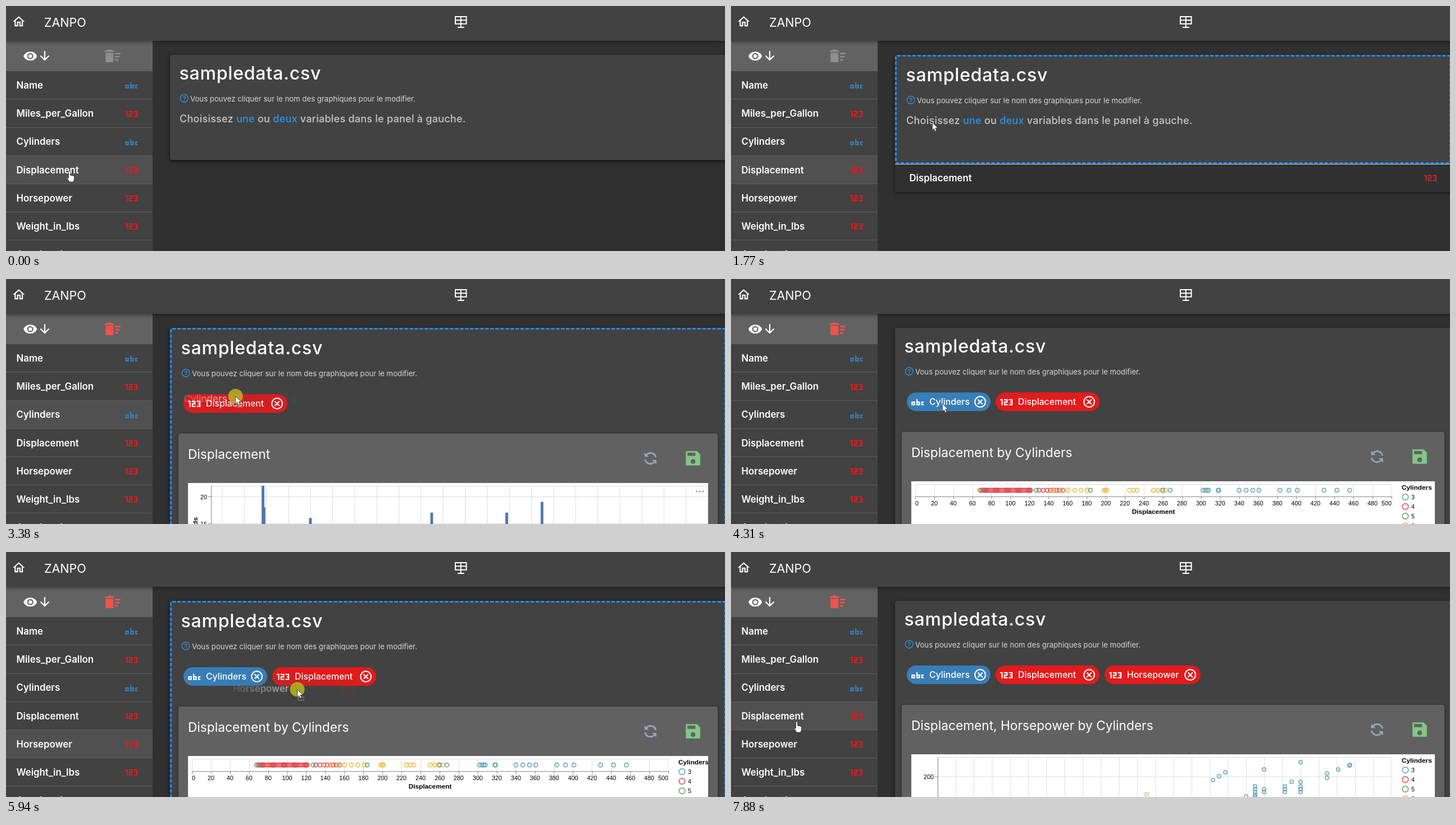
Recreate the animation shown at these times as an HTML page. Size 1280 by 436 pixels, loop 7970 ms.

```html
<!DOCTYPE html>
<html lang="fr">
<head>
<meta charset="utf-8">
<title>Tableau de bord</title>
<style>
html, body { margin: 0; width: 100%; height: 100%; overflow: hidden; background: #303030; }
body { position: relative; font-family: Inter, "Open Sans", sans-serif; font-optical-sizing: none; color: #fff; }
div, svg { position: absolute; box-sizing: border-box; }
svg { overflow: visible; }
.t { white-space: pre; line-height: 40px; margin-top: -20px; }
.blue { color: #3091e6; }
#top { left: 0; top: 0; width: 1280px; height: 62px; background: #424242; z-index: 3;
  box-shadow: 0 2px 4px -1px rgba(0,0,0,.2), 0 4px 5px rgba(0,0,0,.14), 0 1px 10px rgba(0,0,0,.12); }
#side { left: 0; top: 62px; width: 261px; height: 380px; background: #424242; z-index: 2; }
#tools { left: 0; top: 0; width: 261px; height: 54px; background: #626262; }
#bin { left: 190px; top: 27px; }
.row { left: 0; width: 261px; height: 50.2px; border-bottom: 1px solid #5e5e5e; }
.row.on { background: #505050; }
.row .t, #slot .t, #ghost .t { font-weight: 600; font-size: 16.8px; }
#card { left: 292px; top: 87px; width: 990px; background: #424242; border-radius: 4px;
  box-shadow: 0 2px 5px rgba(0,0,0,.45), 0 4px 8px rgba(0,0,0,.25); }
#card.drop { border: 3px dashed #1e90ff; }
.name { font-size: 32px; font-weight: 500; letter-spacing: .8px; }
.help { font-size: 13.2px; color: #d8d8d8; }
.hint { font-size: 18px; font-weight: 500; letter-spacing: .25px; color: #c8c8c8; }
#slot { left: 292px; top: 281px; width: 990px; height: 50px; background: #303030; border-top: 1px solid #d5dde4;
  box-shadow: 0 2px 5px rgba(0,0,0,.5); }
.scene { left: 0; top: 0; width: 100%; }
.chip { top: 115px; height: 33px; border-radius: 17px; }
.chip .t { left: 40px; top: 16.5px; font-size: 15.8px; font-weight: 500; }
.panel { left: 12px; right: 12px; top: 185px; height: 300px; background: #616161; border-radius: 4px;
  box-shadow: 0 1px 5px rgba(0,0,0,.4); }
.panel > .t { font-size: 22.7px; }
.plot { left: 17px; right: 17px; top: 88px; height: 200px; background: #fff; overflow: hidden; }
.plot svg { font-family: "Liberation Sans", Arial, sans-serif; font-size: 10.8px; }
.plot .b { font-size: 11.8px; font-weight: bold; }
.more { right: 1px; top: 1px; width: 28px; height: 28px; border: 1px solid #eee; border-radius: 50%; }
#ghost { width: 261px; height: 50px; background: rgba(70,70,70,.35); opacity: .5; z-index: 5; }
#mouse { left: 0; top: 0; z-index: 6; }
</style>
</head>
<body>
<div id="top"></div>
<div id="side"><div id="tools"></div></div>
<div id="card"></div>
<div id="slot"></div>
<div id="ghost"></div>
<svg id="mouse" width="1" height="1" stroke-width=".8">
  <circle id="press" r="13" fill="#beb81e" fill-opacity=".82"/>
  <path id="hand" fill="#fff" stroke="#222" d="M-1.5 1a1.5 1.5 0 0 1 3 0v6l7 1.5V14L7 19H0l-4.500-7 1.500-1 1.500 1.500z"/>
  <g id="arrow">
    <path fill="#fff" stroke="#222" d="M0 0v14l3-3 2 5 2.500-1-2-5H10z"/>
    <rect id="carry" x="1.5" y="13.5" width="10" height="6" fill="none" stroke="#ddd" stroke-dasharray="1.5 1"/>
  </g>
</svg>
<script>
const $ = id => document.getElementById(id);
const RED = '#e41a1c', BLUE = '#377eb8';

const solid = d => `<path d="${d}"/>`;
const stroke = d => `<path d="${d}" fill="none" stroke="currentColor" stroke-width="2"/>`;
const disc = r => `M${12 - r} 12a${r} ${r} 0 0 0 ${2 * r} 0a${r} ${r} 0 0 0-${2 * r} 0`;
const ICONS = {
  home: solid('M12 3L2 12h3v8h6v-6h2v6h6v-8h3zM12 5.7l5 4.500V18h-2v-6H9v6H7v-7.800z'),
  panel: stroke('M2 3h20v13H2zM2 9.500h20M12 3v20M6 22.500h12'),
  eye: solid('M1 12a12 12 0 0 1 22 0a12 12 0 0 1-22 0z' + disc(5) + disc(3)),
  down: stroke('M12 4v14M5 11.500l7 7 7-7'),
  clear: solid('M3 8h10v12H3zM2 5h3l1-1h4l1 1h3v2H2zM15 8h7v2h-7zM15 12h6v2h-6zM15 16h4v2h-4z'),
  abc: stroke('M7 17v-5H3v4h4M11 7v9h4v-4h-4M22 12h-3v4h3'),
  num: stroke('M2 8h3v9M8 8h5v4H9v4h5M16 8h5v8h-5M18 12h3'),
  sync: stroke('M6 8a7 7 0 0 0 6 11M18 16a7 7 0 0 0-6-11') + solid('M12 15l4 4-4 4zM12 1L8 5l4 4z'),
  save: solid('M17 3H3v18h18V7zM5 5h10v4H5zM12 13a3 3 0 0 0 0 6a3 3 0 0 0 0-6'),
  help: stroke(disc(10)) + stroke('M9 10a3 3 0 1 1 4 3l-1 2M12 16v2'),
  close: stroke(disc(9) + 'M8 8l8 8M16 8l-8 8')
};

const text = (s, x, y, cls = '') => `<div class="t ${cls}" style="left:${x}px;top:${y}px">${s}</div>`;
const icon = (name, x, y, k, color = '#fff', extra = '') =>
  `<svg viewBox="0 0 24 24" width="${24 * k}" height="${24 * k}" fill="currentColor" fill-rule="evenodd"
    style="left:${x - 12 * k}px;top:${y - 12 * k}px;color:${color};${extra}">${ICONS[name]}</svg>`;
const tint = k => k === 'abc' ? BLUE : RED;
const add = (id, html) => $(id).insertAdjacentHTML('beforeend', html);

// Header and sidebar
const fields = [['Name', 'abc'], ['Miles_per_Gallon', 'num'], ['Cylinders', 'abc'], ['Displacement', 'num'],
  ['Horsepower', 'num'], ['Weight_in_lbs', 'num'], ['Acceleration', 'num']];
const ROW = 50.15, ROW0 = 116.3;
const label = ([name, k]) => text(name, 18.5, 24.8) + icon(k, 223, 25.3, 1.1, tint(k));

add('top', icon('home', 22.6, 27.5, 1.06) + `<div class="t" style="left:68px;top:29px;font-size:21.5px">ZANPO</div>` +
  icon('panel', 809.6, 27.5, .98));
add('tools', icon('eye', 43, 27.2, 1.1) + icon('down', 68.5, 27.2, 1.08) +
  `<div id="bin">${icon('clear', 0, 0, 1.4, 'inherit')}</div>`);
fields.forEach((f, i) => add('side', `<div class="row" style="top:${ROW0 - 62 + i * ROW}px">${label(f)}</div>`));
add('slot', text('Displacement', 25.5, 23.5) + icon('num', 953, 24, 1.1, '#b72a2c'));

// Charts, drawn in stage coordinates
const line = (x1, y1, x2, y2, c = '#ddd') => `<path d="M${x1} ${y1}L${x2} ${y2}" stroke="${c}"/>`;
const word = (s, x, y, anchor = 'middle', cls = '') =>
  `<text x="${x}" y="${y}" text-anchor="${anchor}" class="${cls}">${s}</text>`;
const ring = (x, y, c, r = 3.5, o = .8) =>
  `<circle cx="${x}" cy="${y}" r="${r}" fill="none" stroke="${c}" stroke-width="1.9" opacity="${o}"/>`;
const range = (n, f) => Array.from({ length: n }, (_, i) => f(i)).join('');
const TEAL = '#5ba3ad', ROSE = '#e04a50', GREEN = '#5d9e6c', GOLD = '#ecb93f';

// Frame with vertical grid lines; the bottom may lie below the stage
const frame = (x0, x1, n, top, bottom = 460) => line(x0, top, x1, top) +
  range(n + 1, i => line(x0 + (x1 - x0) * i / n, top, x0 + (x1 - x0) * i / n, bottom));
const yTick = (x0, x1, y, s) => line(x0, y, x1, y) + line(x0 - 5, y, x0, y, '#888') + word(s, x0 - 7, y + 4, 'end');

function histogram() {
  const X = v => 264 + v * 1.9636, Y = n => 576 - n * 9.6;
  const peaks = { 97: 22, 98: 18, 140: 16, 250: 17, 318: 17, 350: 19 };
  return frame(382, 1247, 22, 365.5) + line(362, 365.5, 382, 365.5) +
    [20, 15].map(n => yTick(362, 1247, Y(n) + .5, n)).join('') + line(362.5, 365, 362.5, 460, '#888') +
    Object.entries(peaks).map(([v, n]) =>
      `<rect x="${X(v) - 2.4}" y="${Y(n)}" width="4.8" height="100" fill="#4c78a8"/>`).join('') +
    `<text class="b" text-anchor="end" transform="translate(338 421) rotate(-90)">Number of Records</text>`;
}

const legend = () => word('Cylinders', 1194, 375, 'start', 'b') + [TEAL, ROSE, GREEN, GOLD].map((c, i) =>
  ring(1200.5, 388 + i * 17, c, 5.3) + word(3 + i, 1211, 392 + i * 17, 'start')).join('');

function strip() {
  const X = v => 328 + v * 1.696;
  const run = (c, a, b, n) => range(n, i => ring(X(a + (b - a) * i / (n - 1) + Math.sin(i * 7)), 376, c));
  return frame(328.5, 1176, 25, 365.5, 387) + line(328, 387.5, 1177, 387.5, '#888') +
    range(26, i => line(X(i * 20) + .5, 387, X(i * 20) + .5, 392, '#888') +
      word(i * 20, X(i * 20), 402.5, i === 0 ? 'start' : i === 25 ? 'end' : 'middle')) +
    word('Displacement', 752, 418, 'middle', 'b') +
    run(ROSE, 68, 122, 42) + run(ROSE, 130, 156, 8) + run(GOLD, 145, 181, 6) + run(GOLD, 198, 200, 3) +
    run(GOLD, 225, 232, 3) + run(GOLD, 250, 262, 4) + run(GREEN, 70, 183, 3) + run(TEAL, 260, 267, 2) +
    run(TEAL, 302, 307, 4) + run(TEAL, 318, 318, 2) + run(TEAL, 340, 360, 4) + run(TEAL, 383, 400, 3) +
    run(TEAL, 429, 455, 3) + legend();
}

function scatter() {
  const stack = (x, y, n) => range(n, i => ring(x, y + i * 5, TEAL, 3.1));
  const slope = (x, y, dx, dy, n) => range(n, i => ring(x + dx * i, y + dy * i, TEAL, 3.1));
  return frame(368, 1176, 25, 365.5) + yTick(368, 1176, 400, 200) + line(368.5, 365, 368.5, 460, '#888') +
    slope(858, 406, 11, -7, 3) + slope(1061, 394, 20, -7, 3) + slope(1061, 402, 41, -23, 2) +
    slope(949, 387, 65, -13, 2) + slope(998, 409, 16, 0, 2) + slope(917, 435, 16, 0, 2) +
    stack(933, 417, 4) + stack(949, 422, 2) + stack(986, 417, 3) + stack(1014, 417, 3) +
    ring(740, 431, '#f58a4b', 3.1, .55) + legend();
}

// Card and its four scenes
const chip = (name, k, x, w) => `<div class="chip" style="left:${x}px;width:${w}px;background:${tint(k)}">
  ${icon(k, 19.5, 16.8, 1.1)}<div class="t">${name}</div>${icon('close', w - 18.5, 16.2, 1.05)}</div>`;
const scene = html => add('card', `<div class="scene">${html}</div>`);
const result = (title, chart, chips, menu = .2) => scene(chips + `<div class="panel">${text(title, 17, 36.5)}
  ${icon('sync', 0, 44.5, 1.35, '#9aa6c4', 'left:auto;right:104px;transform:rotate(-45deg)')}
  ${icon('save', 0, 44.5, 1.42, '#81c784', 'left:auto;right:27px')}
  <div class="plot"><svg viewBox="321 360 932 100" width="932" height="100">${chart}</svg>
  <div class="more" style="opacity:${menu}"><svg width="1" height="1" fill="#aaa" style="left:13px;top:13px">
  ${range(3, i => `<circle cx="${i * 5.5 - 5.5}" r="1.8"/>`)}</svg></div></div></div>`);

add('card', text('sampledata.csv', 16.5, 33, 'name') + icon('help', 25, 77.5, .68, '#3091e6') +
  text('Vous pouvez cliquer sur le nom des graphiques pour le modifier.', 36, 77.5, 'help'));
scene(text('Choisissez <span class="blue">une</span> ou <span class="blue">deux</span> variables dans le panel à gauche.',
  17, 113.5, 'hint'));
const cyl = chip('Cylinders', 'abc', 21, 149), disp = x => chip('Displacement', 'num', x, 185);
result('Displacement', histogram(), disp(21), 1);
result('Displacement by Cylinders', strip(), cyl + disp(179));
result('Displacement, Horsepower by Cylinders', scatter(), cyl + disp(179) + chip('Horsepower', 'num', 373, 171));

// Each drag: press a row, carry it to the card, release, move on
const LOOP = 7970, STEP = 76.6, CARRY = 970, BACK = 770, SETTLE = 150;
const drags = [
  { down: 300, up: 1690, row: 3, from: [113, 294], to: [460, 203], next: [144, 243] },
  { down: 2690, up: 4160, row: 2, from: [144, 243], to: [476, 207], next: [166, 349] },
  { down: 5160, up: 6640, row: 4, from: [166, 349], to: [564, 243], next: [117, 302] }
];
const mix = (a, b, u) => a + (b - a) * u;
const stepped = t => Math.floor(t / STEP) * STEP;

function pointAt(t, { down, up, from, to, next }) {
  if (t < down) return from;
  if (t < up) {
    const u = Math.min(1, stepped(t - down) / CARRY), e = u * u * (3 - 2 * u);
    return [mix(from[0], to[0], e), mix(from[1], to[1], e * (2 - e))];
  }
  const u = Math.min(1, (stepped(t - up) + STEP) / BACK), e = 1 - (1 - u) ** 1.75;
  return [mix(to[0], next[0], e), mix(to[1], next[1], e * e)];
}

const scenes = document.querySelectorAll('.scene'), rows = document.querySelectorAll('.row');
const show = (el, on) => { el.style.display = on ? '' : 'none'; };
let held = -1;

function carryRow({ row, from: [px, py] }, x, y) {
  const g = $('ghost'), top = ROW0 + row * ROW;
  if (held !== row) g.innerHTML = label(fields[held = row]);
  g.style.left = x - px + 33 + 'px';
  g.style.top = top + y - py + 6 + 'px';
  g.style.maskImage = g.style.webkitMaskImage =
    `radial-gradient(135px 42px at ${px - 33}px ${py - top - 6}px, #000 20%, transparent)`;
}

function draw(t) {
  const d = drags.filter(v => t >= v.down).pop() || drags[0];
  const [x, y] = pointAt(t, d);
  const pressed = t >= d.down && t < d.up;
  const busy = t >= d.down && t < d.up + SETTLE;
  const moved = busy && Math.hypot(x - d.from[0], y - d.from[1]) > 3;
  const carrying = pressed && moved;
  const stage = drags.filter(v => t >= v.up + SETTLE).length;

  scenes.forEach((s, i) => show(s, i === stage));
  $('card').className = moved ? 'drop' : '';
  $('card').style.height = (stage ? 500 : moved ? 194 : 187) + 'px';
  show($('slot'), moved && !stage && x > 292);
  $('bin').style.color = stage ? '#ef5350' : '#8e8e8e';

  const overList = x < 261 && y > ROW0;
  const active = busy ? d.row : overList ? Math.floor((y - ROW0) / ROW) : -1;
  rows.forEach((r, i) => r.classList.toggle('on', i === active));

  show($('ghost'), carrying);
  if (carrying) carryRow(d, x, y);
  const hand = overList && !carrying;
  show($('press'), pressed);
  show($('hand'), hand);
  show($('arrow'), !hand);
  show($('carry'), carrying);
  $('mouse').style.transform = `translate(${x}px, ${y}px)`;
}

const start = performance.now();
function loop() {
  draw((performance.now() - start) % LOOP);
  requestAnimationFrame(loop);
}
loop();
</script>
</body>
</html>
```
